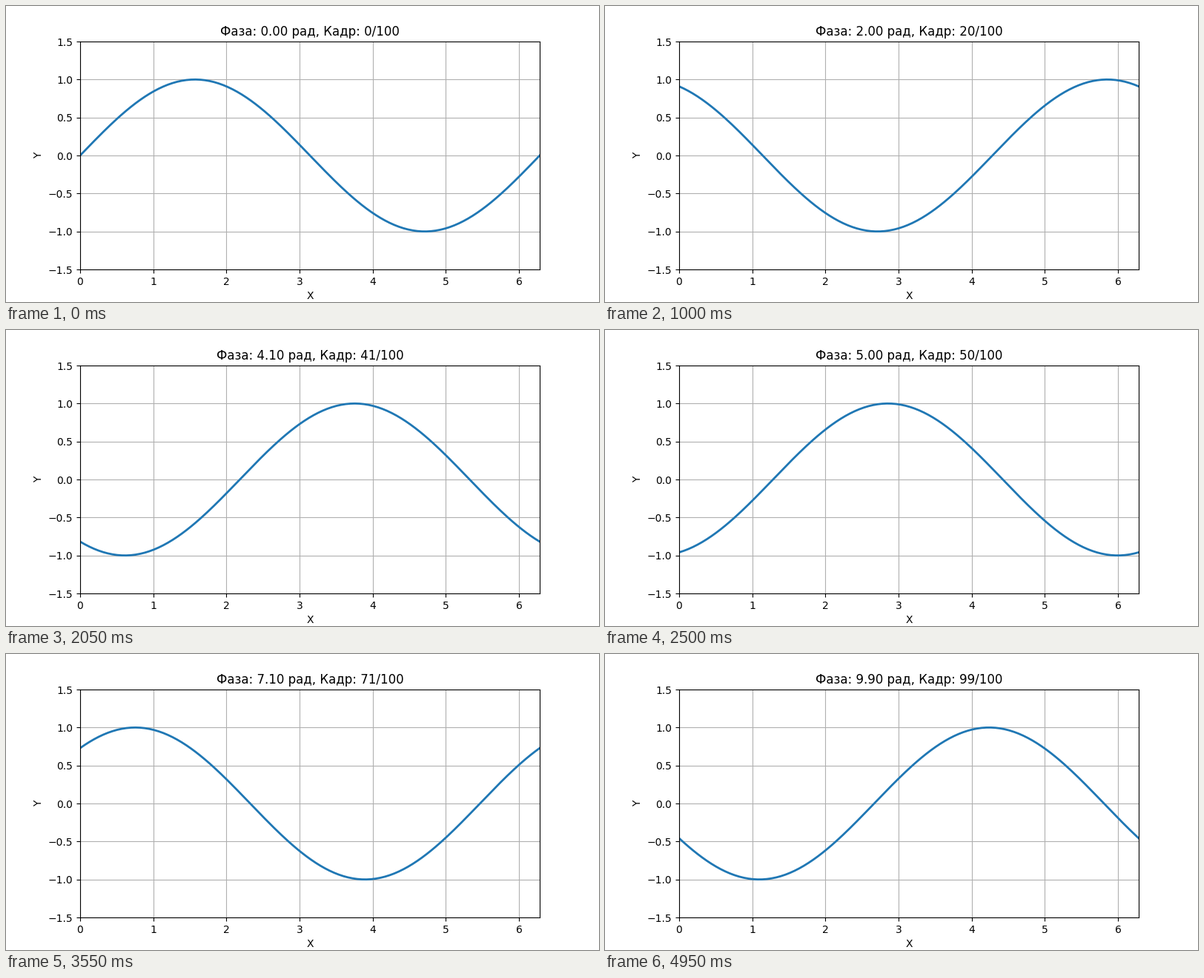
Animation, 800 px wide and 400 px high, one loop 5000 ms. Source, as a matplotlib script:

```python
import numpy as np
import matplotlib.pyplot as plt
from matplotlib.animation import FuncAnimation

FRAMES = 100
INTERVAL = 50  # ms
PHASE_STEP = 0.1  # radians per frame

fig, ax = plt.subplots(figsize=(8, 4), dpi=100)
x = np.linspace(0, 2 * np.pi, 200)
line, = ax.plot(x, np.sin(x), lw=2)

ax.set_xlim(0, 2 * np.pi)
ax.set_ylim(-1.5, 1.5)
ax.set_xlabel("X")
ax.set_ylabel("Y")
ax.grid(True)
title = ax.set_title("")


def update(frame):
    phase = PHASE_STEP * frame
    line.set_ydata(np.sin(x + phase))
    title.set_text(f"Фаза: {phase:.2f} рад, Кадр: {frame}/{FRAMES}")
    return line, title


anim = FuncAnimation(fig, update, frames=FRAMES, interval=INTERVAL,
                     init_func=lambda: update(0), repeat=True, blit=False)
plt.show()
```
